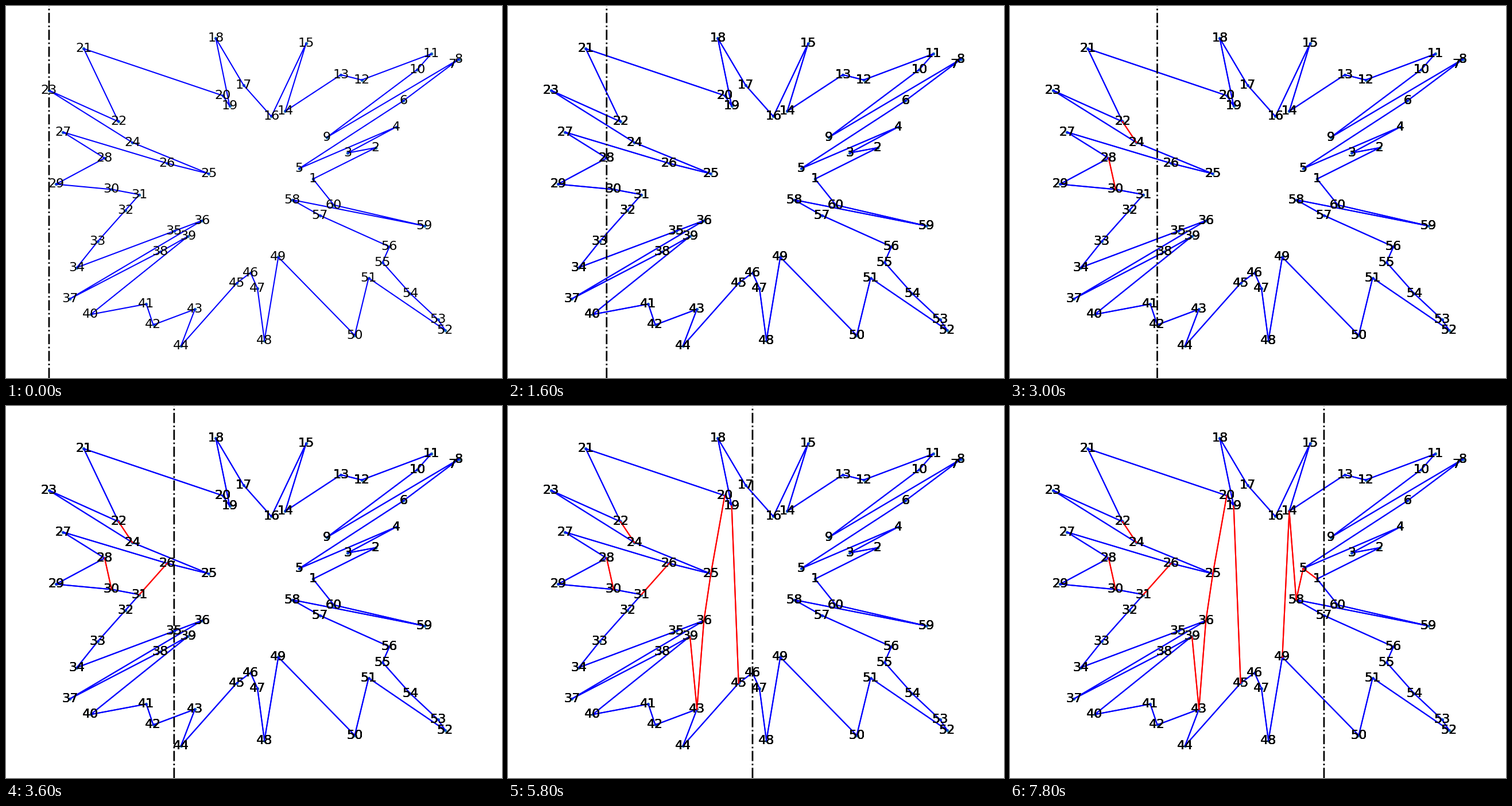
Animation of 864x648 px, one loop 8 s. Source, as a matplotlib script:

```python
import matplotlib.pyplot as plt
import numpy as np
from matplotlib.animation import FuncAnimation

W, H, DPI = 864, 648, 100
FRAMES, STEP_MS = 40, 200
LINE_COATS, TEXT_COATS = 2, 5

# One point per column: its row, counted from the top.
ROWS = np.array([
    10, 28, 18, 50, 44, 2, 53, 39, 23, 29, 16, 33, 20, 30, 51,
    55, 41, 24, 37, 59, 38, 52, 35, 26, 0, 11, 13, 47, 9, 45,
    48, 58, 15, 42, 14, 31, 25, 1, 27, 34, 19, 32, 7, 22, 57,
    8, 46, 21, 43, 40, 17, 12, 49, 6, 36, 3, 54, 56, 5, 4])
N = len(ROWS)


def star_order(cols, rows):
    """Counterclockwise order around the centre of the grid."""
    mid = (N - 1) / 2
    angle = np.arctan2(mid - rows, cols - mid) % (2 * np.pi)
    return np.argsort(angle.round(9), kind="stable")


def monotone_cuts(x, y):
    """Sweep left to right and cut the polygon into x-monotone parts.

    Returns (vertex, helper) pairs; a cut is found when the sweep is at vertex.
    """
    cuts, merges = [], set()
    helper = {}  # lower edges crossed by the sweep, keyed by first vertex

    def height(edge, at):
        end = (edge + 1) % N
        return np.interp(at, [x[edge], x[end]], [y[edge], y[end]])

    for v in np.argsort(x):
        before, after = (v - 1) % N, (v + 1) % N
        came_right, goes_right = x[before] < x[v], x[after] > x[v]
        turn = ((x[v] - x[before]) * (y[after] - y[v])
                - (y[v] - y[before]) * (x[after] - x[v]))
        reflex = turn < 0
        split = reflex and goes_right and not came_right
        merge = reflex and came_right and not goes_right
        upper = not came_right and not goes_right

        if came_right:
            last = helper.pop(before)
            if last in merges:
                cuts.append((v, last))
        if split or merge or upper:
            below = [e for e in helper if height(e, x[v]) < y[v]]
            edge = max(below, key=lambda e: height(e, x[v]))
            if split or helper[edge] in merges:
                cuts.append((v, helper[edge]))
            helper[edge] = v
        if goes_right:
            helper[v] = v
        if merge:
            merges.add(v)
    return cuts


def spread(rank, size):
    """Place ranks evenly, leaving a 5% margin twice over."""
    span = size / 1.21
    return (size - span) / 2 + rank * span / (N - 1)


def coats(count):
    """Filter that looks like the artist painted several times over itself."""
    def apply(img, dpi):
        img[..., 3] = 1 - (1 - img[..., 3]) ** count
        return img, 0, 0
    return apply


def layer(zorder):
    ax = fig.add_axes([0, 0, 1, 1], zorder=zorder)
    ax.set(xlim=(0, W), ylim=(H, 0))
    ax.axis("off")
    return ax


cols = star_order(np.arange(N), ROWS)
rows = ROWS[cols]
xs, ys = spread(cols, W), spread(rows, H)

fig = plt.figure(figsize=(W / DPI, H / DPI), dpi=DPI, facecolor="white")
shapes, labels = layer(1), layer(2)

shapes.plot(xs, ys, ".", color="#1f77b4", ms=6, zorder=1)
outline, = shapes.plot(np.append(xs, xs[0]), np.append(ys, ys[0]),
                       color="blue", lw=1.5, zorder=2)
cuts = []
for v, other in monotone_cuts(cols, -rows):
    line, = shapes.plot(xs[[v, other]], ys[[v, other]],
                        color="red", lw=1.5, zorder=2)
    cuts.append((line, cols[v]))
sweep = shapes.axvline(xs.min(), color="black", ls="-.", lw=2,
                       snap=False, zorder=2.5)

for i in range(N):
    labels.text(xs[i], ys[i], str(i + 1), fontsize=16, family="DejaVu Sans",
                color="black", ha="center", va="center")


def draw(step):
    x = spread(step, W)
    sweep.set_xdata([x, x])
    outline.set_agg_filter(coats(min(step + 1, LINE_COATS)))
    labels.set_agg_filter(coats(min(step + 1, TEXT_COATS)))
    for line, start in cuts:
        age = step - start + 1
        line.set_visible(age > 0)
        line.set_agg_filter(coats(np.clip(age, 1, LINE_COATS)))
    return []


anim = FuncAnimation(fig, draw, frames=FRAMES, init_func=lambda: draw(0),
                     interval=STEP_MS, repeat=True, repeat_delay=0)
plt.show()
```
